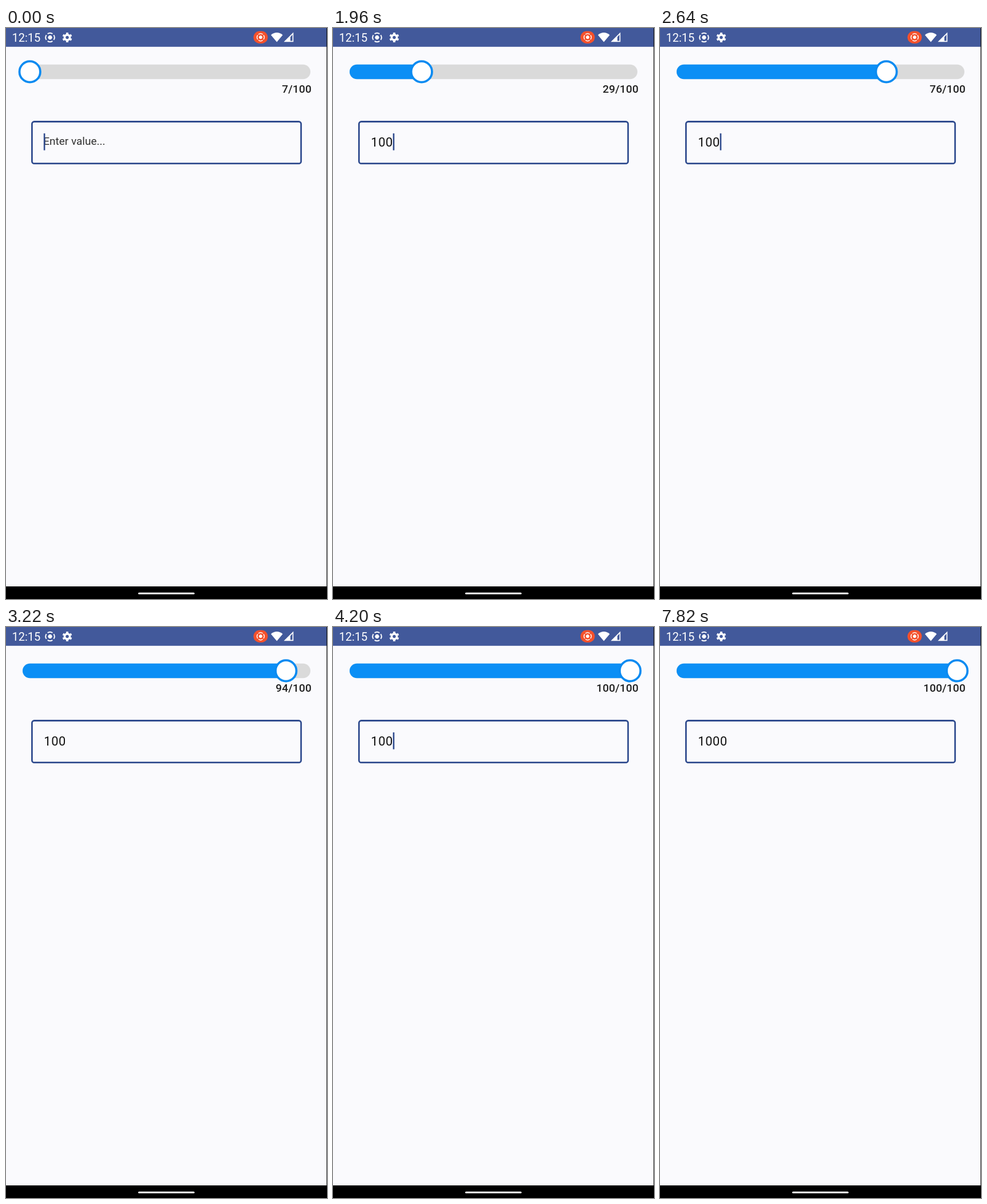
These frames come from a looping animation (561x997 px, 8000 ms). An HTML page:

```html
<!DOCTYPE html>
<html lang="en">
<head>
<meta charset="utf-8">
<title>Slider bound to a text field</title>
<style>
  html, body { margin: 0; width: 100%; height: 100%; overflow: hidden; background: #fafafd; }
  svg { display: block; width: 100vw; height: 100vh; }
  text { font-family: Roboto, "Noto Sans", sans-serif; white-space: pre; }
</style>
</head>
<body>
<svg viewBox="0 0 561 997" preserveAspectRatio="none">
  <rect width="561" height="997" fill="#fafafd"/>

  <!-- status bar -->
  <rect width="561" height="32.8" fill="#42599b"/>
  <text x="10.5" y="24" font-size="20" fill="#fff">12:15</text>
  <g transform="translate(77 16.5) rotate(45)" fill="none" stroke="#fff" stroke-width="1.9">
    <circle r="7.7" pathLength="80" stroke-dasharray="15 5" stroke-dashoffset="-2.5"/>
    <circle r="3.5" fill="#fff" stroke="none"/>
  </g>
  <g transform="translate(107 16.5)" fill="none" stroke="#fff">
    <circle r="4.6" stroke-width="3.6"/>
    <circle r="7.2" stroke-width="2.8" pathLength="60" stroke-dasharray="5 5" stroke-dashoffset="-2.5"/>
  </g>
  <rect x="432.5" y="5.5" width="25" height="21.5" rx="10.7" fill="#f4512c"/>
  <g transform="translate(445 16.2) rotate(45)" fill="none" stroke="#fff" stroke-width="1.5">
    <circle r="6.3" pathLength="80" stroke-dasharray="16 4" stroke-dashoffset="-2"/>
    <circle r="2.9" fill="#fff" stroke="none"/>
  </g>
  <path d="M463 12.2Q473.3 4 483.6 12.2L473.3 24.4Z" fill="#fff"/>
  <path d="M485.5 24.3L502.3 7.5V24.3Z" fill="#fff"/>
  <path d="M497 15.5L500.6 11.8V22.6H497Z" fill="#42599b"/>

  <!-- slider -->
  <rect x="29" y="63.7" width="503" height="25.6" rx="12.8" fill="#dadada"/>
  <path id="fill" fill="#0b8ff5"/>
  <circle id="thumb" cy="76.4" r="18.2" fill="#fff" stroke="#0b8bf1" stroke-width="3.8"/>
  <text id="counter" x="533.9" y="113.2" font-size="19.1" font-weight="500" letter-spacing=".14" fill="#1f1f1f" text-anchor="end"></text>

  <!-- text field -->
  <rect x="45.4" y="163.5" width="470.3" height="73.2" rx="4" fill="none" stroke="#304c8f" stroke-width="2.8"/>
  <text id="hint" x="65.2" y="204.2" font-size="19" fill="#303030">Enter value...</text>
  <text id="entry" x="66.2" y="207.4" font-size="21.84" letter-spacing=".68" fill="#111"></text>
  <rect id="cursor" y="184" width="2.6" height="29.5" fill="#304c8f"/>

  <!-- navigation bar and screen edge -->
  <rect y="975" width="561" height="22" fill="#000"/>
  <rect x="231" y="985.7" width="98.5" height="3" rx="1.5" fill="#fff"/>
  <rect x="560" width="1" height="997" fill="#000" opacity=".8"/>
</svg>
<script>
const LOOP = 8000;
const TWEEN = 2857;      // duration of one slider animation
const BLINK = 1400;      // half a cursor period
const FRAME = 70;        // the slider is redrawn at this interval
const START_VALUE = 7.1;

const byId = id => document.getElementById(id);
const [fill, thumb, counter, hint, entry, cursor] =
  ["fill", "thumb", "counter", "hint", "entry", "cursor"].map(byId);

// Each key press sets the text; each retarget restarts the slider tween.
const typed = [{ at: 0, text: "" }, { at: 260, text: "1" }, { at: 940, text: "10" },
               { at: 1380, text: "100" }, { at: 6400, text: "1000" }];
const targets = [{ at: 260, to: 1 }, { at: 940, to: 10 }, { at: 1226, to: 100 }];

const clamp = (v, lo, hi) => Math.min(hi, Math.max(lo, v));

// cubic-bezier(.4, 0, .2, 1), solved for its parameter by bisection
function ease(u) {
  let lo = 0, hi = 1;
  for (let i = 0; i < 24; i++) {
    const s = (lo + hi) / 2;
    const x = 1.2 * s * (1 - s) ** 2 + 0.6 * s * s * (1 - s) + s ** 3;
    if (x < u) lo = s; else hi = s;
  }
  return lo * lo * (3 - 2 * lo);
}

function sliderValue(t) {
  let value = START_VALUE;
  targets.forEach(({ at, to }, i) => {
    const end = Math.min(t, targets[i + 1]?.at ?? LOOP);
    value += (to - value) * ease(clamp((end - at) / TWEEN, 0, 1));
  });
  return value;
}

function render(t) {
  const value = sliderValue(Math.floor(t / FRAME) * FRAME);
  const x = clamp(value * 5.2, 41.7, 519.2);
  thumb.setAttribute("cx", x);
  fill.setAttribute("d", `M${x} 63.7H41.8a12.8 12.8 0 0 0 0 25.6H${x}Z`);
  counter.textContent = `${Math.floor(value + 1e-3)}/100`;

  const { at, text } = typed.findLast(key => key.at <= t);
  entry.textContent = text;
  hint.style.display = text ? "none" : "";
  cursor.setAttribute("x", 65.8 + text.length * 12.97);
  cursor.style.display = Math.floor((t - at) / BLINK) % 2 ? "none" : "";
}

const origin = performance.now();
function tick() {
  render((performance.now() - origin) % LOOP);
  requestAnimationFrame(tick);
}
render(0);
requestAnimationFrame(tick);
</script>
</body>
</html>
```
